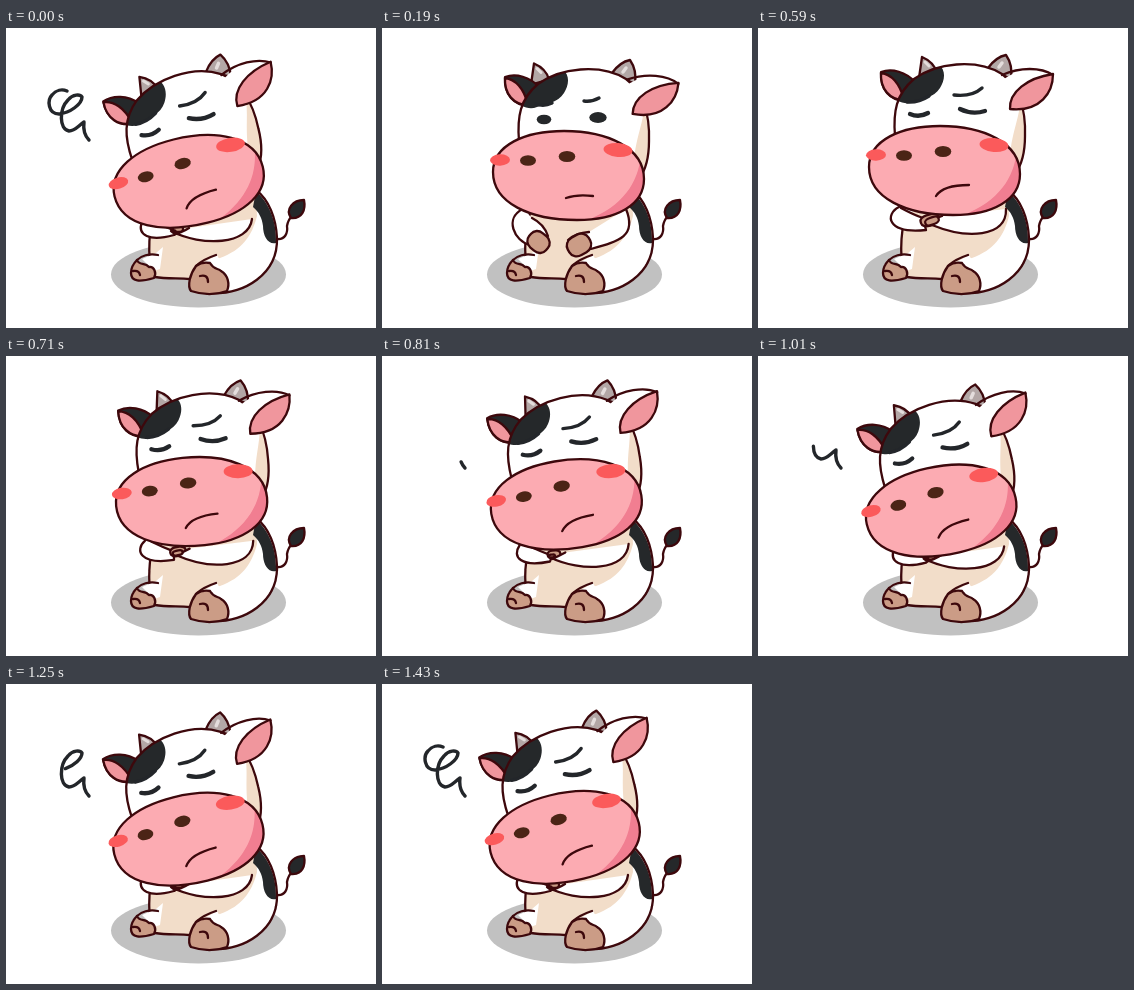
An HTML page that plays this animation: 370x300 px, repeating every 1930 ms.

```html
<!DOCTYPE html>
<html lang="en">
<head>
<meta charset="utf-8">
<title>Weary cow</title>
<style>
html, body { margin: 0; width: 100%; height: 100%; overflow: hidden; background: #fff; }
svg { display: block; width: 100%; height: 100%; }
.line { stroke: #3d080c; stroke-width: 2.3; stroke-linejoin: round; stroke-linecap: round; }
.ink { fill: none; stroke: #23262a; stroke-linecap: round; stroke-linejoin: round; }
.none { fill: none; }
.white { fill: #fff; }
.black { fill: #25282a; }
.cream { fill: #f2ddc9; }
.hoof { fill: #cb9c86; }
.pink { fill: #f0969d; }
.horn { fill: #b3a7a6; }
.red { fill: #fb5a5b; }
</style>
</head>
<body>
<svg viewBox="0 0 370 300">
  <defs>
    <path id="skull" d="M140 146L137 108C135 84 138 66 156 51C178 35 218 30 244 46C260 58 268 80 267 108C267 125 263 138 257 146"/>
    <path id="muzzle" d="M111 139C111 112 143 98 182 98C226 98 262 115 262 146C262 172 235 187 195 187C148 187 111 170 111 139Z"/>
    <clipPath id="skullClip"><use href="#skull"/></clipPath>
    <clipPath id="muzzleClip"><use href="#muzzle"/></clipPath>
  </defs>

  <ellipse cx="192.5" cy="246.5" rx="87.5" ry="33" fill="#c1c1c1"/>

  <g id="tail">
    <path class="line none" d="M271 211C279 212 282 205 281 198Q282 192 286 188"/>
    <path class="line black" d="M285 190C279 181 287 172 298 172C300 182 296 191 285 190Z"/>
  </g>

  <g id="body">
    <path class="white" d="M148 185C141 210 142 240 149 249C160 251 172 250 184 251L200 265C240 268 272 245 271 210C270 190 263 172 250 162Z"/>
    <path class="cream" d="M148 185C141 210 142 240 149 249C160 251 172 250 184 251C190 238 202 231 214 230C236 222 246 208 251 188L250 165Z"/>
    <path class="black" d="M250 163C262 174 271 192 270 215C262 217 257 208 257 198C256 190 253 184 247 179Z"/>
    <path class="line none" d="M148 185C141 210 142 240 149 249C160 251 172 250 184 251L200 265C240 268 272 245 271 210C270 190 263 172 250 162"/>
  </g>

  <g id="feet">
    <path class="white" d="M157 219L154 241L148 243L136 231L150 225Z"/>
    <path class="line none" d="M152 227C143 225 135 228 131 232"/>
    <path class="line hoof" d="M131 232C133 238 139 234 143 239C148 238 151 245 148 250C134 254 125 254 125 245C125 240 128 235 131 232Z"/>
    <path class="line none" d="M127 243Q133 242 134 247"/>
    <path class="white" d="M211 227L190 239L205 236L222 247Z"/>
    <path class="line none" d="M210 227C201 230 194 234 190 238"/>
    <path class="line hoof" d="M190 238C184 246 181 258 185 263C197 267 210 267 221 263C224 256 222 247 215 243C212 240 208 242 204 235C199 234 194 235 190 238Z"/>
    <path class="line none" d="M194 248Q202 246 202 254"/>
  </g>

  <path id="armL" class="line white"/>
  <rect id="hoofL" class="line hoof"/>
  <path id="armR" class="line white"/>
  <rect id="hoofR" class="line hoof"/>

  <g id="head">
    <g id="hornL">
      <path class="line horn" d="M161 50L164 29Q176 34 179 45Z"/>
      <path d="M167 34l4 4" stroke="#e4dddc" stroke-width="3" stroke-linecap="round"/>
    </g>
    <path class="line horn" d="M230 40Q238 29 248 27Q255 37 253 51Z"/>
    <path d="M244 35l-3 4" stroke="#e4dddc" stroke-width="3.5" stroke-linecap="round"/>
    <path class="line black" d="M123 44C134 40 148 44 157 54L147 73C132 72 122 62 123 44Z"/>
    <path class="line pink" d="M123 45C133 46 142 55 146 72C132 72 122 61 123 45Z"/>

    <g clip-path="url(#skullClip)">
      <rect class="white" x="130" y="30" width="145" height="120"/>
      <path class="cream" d="M262 64C264 92 251 102 251 146L275 146L275 64Z"/>
      <path class="black" d="M138 72C147 56 158 45 178 34C189 41 187 52 182 60C176 70 163 71 155 74C150 76 146 76 138 72Z"/>
    </g>
    <use href="#skull" class="line none"/>

    <g id="earR">
      <path class="white" d="M246 51C262 40 282 38 295 47L252 81Z"/>
      <path class="line none" d="M244 47C262 39 283 39 295 47"/>
      <path class="line pink" d="M252 81C251 64 269 50 295 46C295 64 283 84 252 81Z"/>
    </g>

    <g id="shut" class="ink" stroke-width="4.3">
      <path d="M152 86Q161 90 170 85"/>
      <path d="M202 81Q214 87 227 83"/>
      <path d="M149 74Q160 75 171 68" stroke-width="3.4"/>
      <path d="M196 67Q214 69 224 60" stroke-width="3.4"/>
    </g>
    <g id="open">
      <ellipse class="black" cx="162" cy="86.5" rx="7.3" ry="4.8"/>
      <ellipse class="black" cx="216" cy="84.5" rx="8.7" ry="5.4"/>
      <path class="ink" stroke-width="3.4" d="M154 71Q162 74 170 70M202 68Q210 69 217 65"/>
    </g>

    <g clip-path="url(#muzzleClip)">
      <rect x="105" y="90" width="165" height="105" fill="#fcabb2"/>
      <path d="M259 122C256 151 240 174 203 188L270 192L270 122Z" fill="#f17e91"/>
    </g>
    <use href="#muzzle" class="line none"/>
    <g fill="#4b2416">
      <ellipse cx="146" cy="127.5" rx="8" ry="5.3"/>
      <ellipse cx="185" cy="123.5" rx="8.3" ry="5.5"/>
    </g>
    <ellipse class="red" cx="118" cy="127" rx="10" ry="5.7" transform="rotate(-2 118 127)"/>
    <ellipse class="red" cx="236" cy="117" rx="14.5" ry="7" transform="rotate(5 236 117)"/>
    <path id="mouth" class="line none"/>
  </g>

  <path id="scribble" class="ink" stroke-width="3.4" pathLength="1"
    d="M83 112C79 108 77 102 78 94C72 98 69 103 63 103C53 101 53 81 62 72C67 66 74 66 76 69C76 76 64 85 53 86C42 86 41 72 46 67C50 62 56 61 61 63"/>
</svg>

<script>
const LOOP = 1930, END = 1430;
const STEPS = [60, 190, 290, 390, 490, 590, 650, 710, 810, 910, 1010, 1070];
for (let t = 1130; t <= END; t += 60) STEPS.push(t);

const $ = id => document.getElementById(id);
const mix = (a, b, k) => a + (b - a) * k;

// Piecewise linear track through [time, value] keys
const track = (...keys) => t => {
  const i = keys.findIndex(k => k[0] >= t);
  if (i < 0) return keys[keys.length - 1][1];
  if (i === 0) return keys[0][1];
  const [t0, a] = keys[i - 1], [t1, b] = keys[i];
  return mix(a, b, (t - t0) / (t1 - t0));
};

const angle = track([590, 0], [710, -6], [810, -9.7], [910, -12], [1130, -14]);
const headX = track([590, 177], [810, 171.5], [1130, 168], [END, 168.5]);
const headY = track([60, 126], [190, 127], [390, 123], [590, 122], [810, 130], [1010, 137], [1130, 139], [END, 136]);
const droop = track([190, 1], [390, 0]);
const fold = track([190, 0], [390, 1], [590, 2], [810, 2.7], [1070, 3]);
const frown = track([190, 0], [390, 1], [590, 2]);
const ink = track([710, 0], [810, 0.045], [1130, 0.5], [END, 1]);

const states = (...rows) => k => {
  const i = Math.min(Math.floor(k), rows.length - 2);
  const [a, b] = [rows[i], rows[i + 1]].map(r => r.split(" ").map(Number));
  return a.map((v, n) => mix(v, b[n], k - i));
};

// Shoulder, two controls, wrist, then wrist top and its curve back
const armL = states(
  "141 181 122 190 132 213 148 217 166 208 162 196 150 190",
  "143 181 125 187 128 210 164 208 163 190 156 187 148 188",
  "141 179 127 186 128 206 168 202 165 190 156 187 143 180",
  "136 194 131 207 143 214 168 207 172 204 160 199 150 195");
const armR = states(
  "244 181 255 208 238 213 209 221 186 212 194 205 207 204",
  "247 181 248 207 230 210 195 210 185 189 195 186 206 188",
  "248 181 249 210 208 211 174 197 173 196 177 190 184 188",
  "246 191 243 217 196 219 165 203 169 206 175 205 183 200");
// Centre, size, turn
const hoofL = states("156.5 214 22 19 40", "170 199 18 17 0", "172 192 19 11 -15", "172 201 10 6 0");
const hoofR = states("197 217 24 20 -30", "186.5 200 18 20 -10", "174 193 14 7 -20", "168 203 3 1 0");
const mouth = states("184 165 195 161 211 163", "180 163 187 157 209 158", "178 168 185 157 211 157");

function setPath(id, form, values) {
  let n = 0;
  $(id).setAttribute("d", form.replace(/#/g, () => values[n++] + " " + values[n++]));
}

function setHoof(id, [x, y, w, h, turn]) {
  const attrs = {
    x: x - w / 2, y: y - h / 2, width: w, height: h,
    rx: w * 0.38, ry: h * 0.42, transform: `rotate(${turn} ${x} ${y})`
  };
  for (const name in attrs) $(id).setAttribute(name, attrs[name]);
}

const show = (id, on) => { $(id).style.display = on ? "" : "none"; };
const move = (id, value) => $(id).setAttribute("transform", value);

function draw(ms) {
  const t = STEPS.filter(s => s <= ms).pop() ?? END;
  const awake = t < 290, k = fold(t);
  move("head", `translate(${headX(t) - 177} ${headY(t) - 122}) rotate(${angle(t)} 177 122)`);
  move("earR", `rotate(${droop(t) * 5} 252 65)`);
  move("hornL", `translate(${droop(t) * -12} ${droop(t) * 1.5})`);
  show("open", awake);
  show("shut", !awake);
  setPath("armL", "M#C###L#Q# #".replace("###", "# # #"), armL(k));
  setPath("armR", "M#C# # #L#Q# #", armR(k));
  setHoof("hoofL", hoofL(k));
  setHoof("hoofR", hoofR(k));
  setPath("mouth", "M#Q# #", mouth(frown(t)));
  show("scribble", ink(t) > 0);
  $("scribble").setAttribute("stroke-dasharray", ink(t) + " 2");
}

const start = performance.now();
function tick(now) {
  draw(Math.max(0, now - start) % LOOP);
  requestAnimationFrame(tick);
}
draw(0);
requestAnimationFrame(tick);
</script>
</body>
</html>
```
